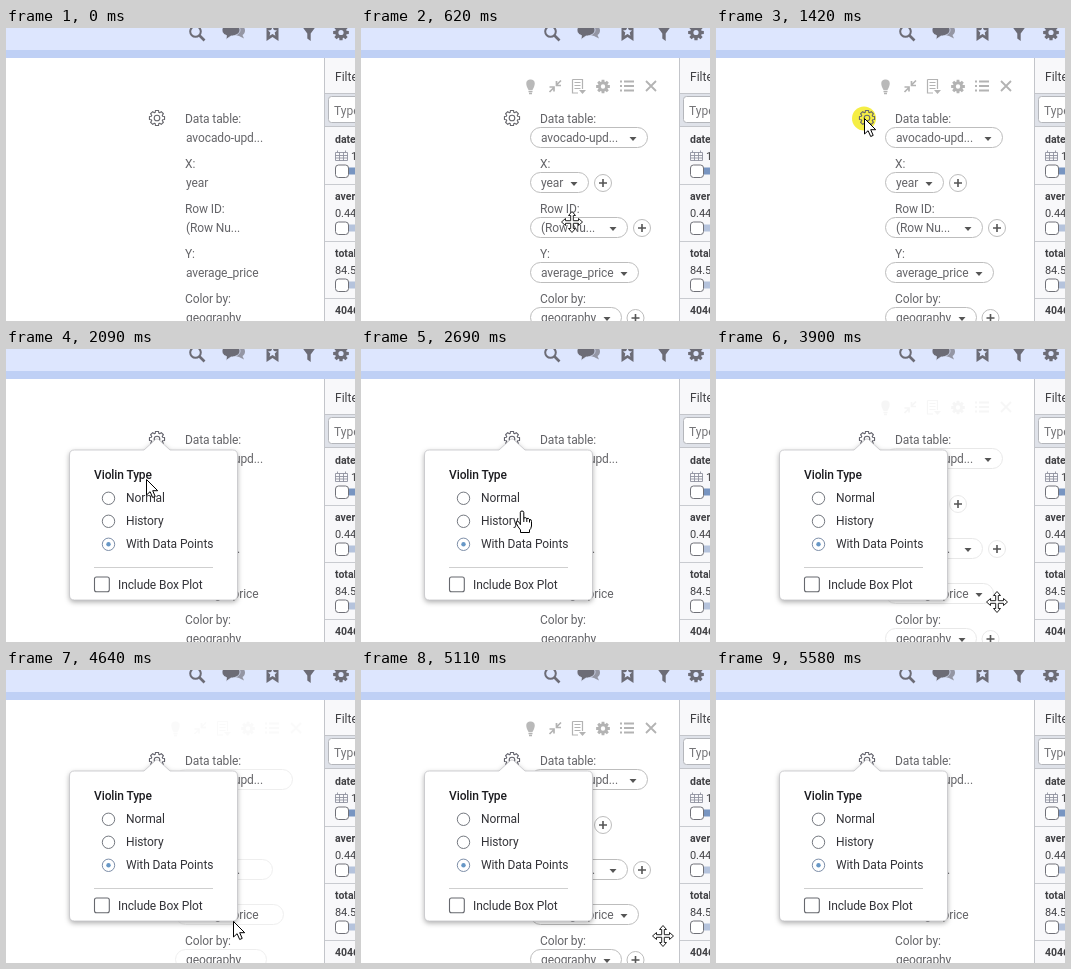
An HTML page for the animation above (6.18 s loop, 349 by 293 pixels).

```html
<!DOCTYPE html>
<html lang="en">
<head>
<meta charset="utf-8">
<title>Violin settings popover</title>
<style>
html, body { margin: 0; width: 100%; height: 100%; overflow: hidden; background: #fff; }
svg { display: block; width: 349px; height: 293px; }
text { font: 12px Roboto, Arial, sans-serif; letter-spacing: -.1px; fill: #646468; white-space: pre; }
.pop text { fill: #333338; }
.pop .title { font-weight: 500; fill: #1c1c20; }
.panel text { font-size: 11px; fill: #404044; }
.panel .name { font-weight: 700; font-size: 10.5px; letter-spacing: 0; }
.panel .head { font-size: 12px; letter-spacing: 0; }
.panel .hint { font-size: 12px; letter-spacing: 0; fill: #757578; }
</style>
</head>
<body>
<svg id="stage" viewBox="0 0 349 293" xmlns="http://www.w3.org/2000/svg">
  <rect width="349" height="293" fill="#fff"/>
  <rect width="349" height="22" fill="#dde6fe"/>
  <rect y="22" width="349" height="8" fill="#bfd0f5"/>

  <g id="header" fill="#6c6c76" stroke="none">
    <g fill="none" stroke="#6c6c76" stroke-width="2">
      <circle cx="189.500" cy="3.500" r="5.300"/>
      <path d="M193.500 7.500L198.500 12.500" stroke-width="2.600"/>
    </g>
    <path d="M231 -3C236 -3 239 -1 239 2.500C239 4.500 238 6 236.500 7L238 10.500L233 8L229 7Z" fill="#9496a4"/>
    <path d="M225 -4C231 -4 234 -1 234 2C234 5.500 230 8 225 8L220 11.500L220.500 7.500C217.500 6.500 216 4.500 216 2C216 -1 219 -4 225 -4Z" stroke="#dde6fe" stroke-width=".8"/>
    <path d="M260.500 -3H272.500V13L266.500 9L260.500 13Z"/>
    <path d="M266.500 -1L267.900 2.100L271 2.400L268.700 4.500L269.400 7.700L266.500 6L263.600 7.700L264.300 4.500L262 2.400L265.100 2.100Z" fill="#dde6fe"/>
    <path d="M296.500 -1H309.500L304.700 5.500V13L301.300 10.500V5.500Z"/>
  </g>

  <g id="fields"></g>
  <g id="tools" fill="none" stroke="#b3b3b3" stroke-width="2">
    <path d="M166 59C163.500 52 168 51.500 169.500 51.500C171 51.500 175.500 52 173 59L171.500 62H167.500Z" fill="#b9b9b9" stroke="none"/>
    <path d="M167.500 63.500H171.500M168 65.500H171" stroke-width="1.300"/>
    <path d="M200 52.500L195.500 57M195.500 53V57.500H200M188.500 64L193 59.500M188.500 59H193V63.500" stroke-width="1.700"/>
    <path d="M211.500 51.500H221.500V61M211.500 51.500V65H217M213.500 54.500H219.500M213.500 57.500H219.500M213.500 60.500H219.500" stroke-width="1.200"/>
    <path d="M218 62H225L221.500 66Z" fill="#b3b3b3" stroke="none"/>
    <path d="M263 53.500H273M263 58H273M263 62.500H273M259 53.500H261M259 58H261M259 62.500H261"/>
    <path d="M285 53L295 63M295 53L285 63" stroke-width="1.800"/>
  </g>

  <g id="panel" class="panel">
    <rect x="318" y="30" width="31" height="263" fill="#f8f8fa"/>
    <rect x="318" y="65" width="31" height="33" fill="#dfe2e9"/>
    <path d="M318.500 30V293M318 65.500H349M318 98.500H349" stroke="#c3c5ca"/>
    <rect x="322.500" y="68.500" width="50" height="26" rx="3" fill="#fff" stroke="#b4b6bb"/>
    <text class="head" x="329" y="53">Filters</text>
    <text class="hint" x="328" y="86.500">Type to search</text>
  </g>

  <circle id="click" cx="148" cy="90.500" r="12" fill="#f5ee45"/>
  <g id="gear"></g>

  <g id="pop" class="pop">
    <g style="filter:drop-shadow(0 2px 2.500px rgba(0,0,0,.3))">
      <path d="M68.500 101H138L149.500 90.500Q151 89.200 152.500 90.500L164 101H226.500Q231.500 101 231.500 106V246Q231.500 251 226.500 251H68.500Q63.500 251 63.500 246V106Q63.500 101 68.500 101Z" fill="#fff" stroke="#c4c4c8" stroke-width=".8"/>
    </g>
    <text class="title" x="88" y="130">Violin Type</text>
    <path d="M88 218.500H207" stroke="#cfcfcf"/>
    <rect id="check" x="88.500" y="228" width="14.800" height="14.800" rx="2" fill="#fff" stroke-width="1.100"/>
    <text x="112" y="240">Include Box Plot</text>
  </g>

  <g id="cursor" stroke-linejoin="round">
    <path id="arrow" d="M.500 .500V16L4.100 12.700L6.700 18.500L9.200 17.400L6.700 11.700H11.700Z" fill="#fff" stroke="#000"/>
    <path id="hand" d="M-1.700 14V1.500Q-1.700 0 0 0Q1.800 0 1.800 1.500V7Q3.500 6 4.800 7.500Q6.500 6.700 7.500 8.500Q9.500 8 9.500 10.500V15Q9 18 7.500 19V21.500H-1.500V19Q-4 16 -5.700 12.500Q-6.200 10 -4.200 10.300Q-2.800 11 -1.700 13M1.800 7V11M4.800 7.500V11M7.500 8.500V11.500" fill="#fff" stroke="#000"/>
    <path id="move" d="M0 -10.500L3.500 -6.500H1.300V-1.300H6.500V-3.500L10.500 0L6.500 3.500V1.300H1.300V6.500H3.500L0 10.500L-3.500 6.500H-1.300V1.300H-6.500V3.500L-10.500 0L-6.500 -3.500V-1.300H-1.300V-6.500H-3.500Z" fill="#fff" stroke="#222"/>
  </g>
</svg>
<script>
const LOOP = 6180, FIRST = 350, STEP = 66.8, FADE = 150;
const OPEN_AT = 1550, CLICK_AT = 1415, LEAVE_AT = 5555;
const el = id => document.getElementById(id);

function add(parent, tag, attrs, text) {
  const node = document.createElementNS('http://www.w3.org/2000/svg', tag);
  for (const k in attrs) node.setAttribute(k, attrs[k]);
  if (text) node.textContent = text;
  parent.appendChild(node);
  return node;
}

// Eight-toothed gear around a hole
function gearPath(cx, cy, outer, inner, hole) {
  let d = '';
  for (let i = 0; i < 8; i++) {
    [[-.31, inner], [-.2, outer], [.2, outer], [.31, inner]].forEach(([off, r]) => {
      const a = (i / 8) * Math.PI * 2 + off;
      d += (d ? 'L' : 'M') + (cx + r * Math.cos(a)).toFixed(2) + ' ' + (cy + r * Math.sin(a)).toFixed(2);
    });
  }
  return `${d}ZM${cx - hole} ${cy}a${hole} ${hole} 0 1 0 ${2 * hole} 0a${hole} ${hole} 0 1 0 ${-2 * hole} 0Z`;
}

add(el('header'), 'path', { d: gearPath(335, 4.5, 8, 5.8, 2.6), 'fill-rule': 'evenodd' });
add(el('tools'), 'path', { d: gearPath(242, 58.5, 7, 5.1, 2.2), 'fill-rule': 'evenodd', fill: '#b3b3b3', stroke: 'none' });
const gear = add(el('gear'), 'path', {
  d: gearPath(151, 90, 7.7, 5.9, 2.8), fill: 'none', 'stroke-width': 1.1, 'stroke-linejoin': 'round'
});

// Axis selectors: label, value, pill right edge, plus button
const fields = el('fields');
const borders = add(fields, 'g', { fill: '#fff', stroke: '#bdbdbd' });
const marks = add(fields, 'g', { fill: '#555', stroke: 'none' });
const rings = add(marks, 'g', { fill: '#fff', stroke: '#bdbdbd' });
[
  ['Data table:', 'avocado-upd...', 286.5, 0],
  ['X:', 'year', 227.5, 242],
  ['Row ID:', '(Row Nu...', 266.5, 281],
  ['Y:', 'average_price', 277.5, 0],
  ['Color by:', 'geography', 260.5, 274.5]
].forEach(([label, value, right, plus], i) => {
  const y = 110 + 45 * i;
  add(borders, 'rect', { x: 169.5, y: y - 10.5, width: right - 169.5, height: 20, rx: 10 });
  add(marks, 'path', { d: `M${right - 18} ${y - 1}h7l-3.500 4z` });
  if (plus) {
    add(rings, 'circle', { cx: plus, cy: y, r: 8.5 });
    add(marks, 'path', { d: `M${plus - 4} ${y}h8M${plus} ${y - 4}v8`, stroke: '#555', 'stroke-width': 1.6 });
  }
  add(fields, 'text', { x: 179, y: y - 15 }, label);
  add(fields, 'text', { x: 180, y: y + 4 }, value);
});

const panel = el('panel');
[['date', '1'], ['average_price', '0.44'], ['total_volume', '84.5'], ['4046', '']].forEach(([name, low], i) => {
  const y = 115 + 57 * i;
  add(panel, 'text', { class: 'name', x: 329, y }, name);
  if (!low) return;
  add(panel, 'text', { x: i ? 329 : 345, y: y + 17 }, low);
  if (!i) add(panel, 'path', {
    d: 'M329.500 124.500h12v8h-12zM329 127.500h13M329 130h13M333.500 124v9M337.500 124v9M331.500 122.500v2M339.500 122.500v2',
    fill: 'none', stroke: '#9092a0', 'stroke-width': .9
  });
  add(panel, 'rect', { x: 342, y: y + 24.5, width: 7, height: 7, fill: i ? '#b5c3dc' : '#7895c1' });
  add(panel, 'rect', { x: 329.5, y: y + 22, width: 13, height: 12.5, rx: 3, fill: '#fff', stroke: '#707178' });
  add(panel, 'path', { d: `M319 ${y + 41.5}h30`, stroke: '#c9cbd0' });
});

const pop = el('pop');
['Normal', 'History', 'With Data Points'].forEach((label, i) => {
  const y = 149 + 23 * i, on = i === 2;
  add(pop, 'circle', { cx: 102.5, cy: y + .3, r: 6.2, fill: '#fff', stroke: on ? '#7d8ea8' : '#74787f' });
  if (on) add(pop, 'circle', { cx: 102.5, cy: y + .3, r: 2.2, fill: '#6797c6' });
  add(pop, 'text', { x: 120, y: y + 4 }, label);
});

// Pointer path: time, x, y
const path = [
  [350, 268, 285], [600, 215, 200], [800, 168, 125], [950, 149, 98], [1020, 149, 97],
  [1150, 148, 90], [1930, 148, 90], [2086, 140, 130], [2290, 138, 202], [2560, 146, 152],
  [2720, 165, 165], [2880, 150, 192], [3100, 128, 228], [3220, 124, 234], [3350, 124, 234],
  [3600, 190, 250], [3890, 281, 253], [3960, 309, 256], [4150, 321, 250], [4300, 300, 255],
  [4625, 227, 251], [4900, 280, 262], [5290, 325, 270], [5560, 326, 272]
];
const hovers = [[350, 1540], [3840, 4512], [4760, 5400]];
const clamp = v => Math.max(0, Math.min(1, v));

function pointer(t) {
  let i = 1;
  while (i < path.length - 1 && path[i][0] < t) i++;
  const a = path[i - 1], b = path[i];
  const k = clamp((t - a[0]) / (b[0] - a[0]));
  return [a[1] + (b[1] - a[1]) * k, a[2] + (b[2] - a[2]) * k];
}

function pointerKind(x, y, open) {
  if (open && x > 64 && x < 232 && y > 101 && y < 253) {
    const onRadio = y > 140 && y < 204, onCheck = y > 224 && y < 248;
    return x < 210 && (onRadio || onCheck) ? 'hand' : 'arrow';
  }
  return x > 165 && x < 312 && y > 95 ? 'move' : 'arrow';
}

const show = (node, on) => { node.style.display = on ? '' : 'none'; };

function draw(time) {
  const t = FIRST + Math.floor((time - FIRST) / STEP) * STEP;
  const open = t >= OPEN_AT;
  const [x, y] = pointer(t);
  const kind = pointerKind(x, y, open);

  let fade = 0, hovered = false;
  for (const [on, off] of hovers) {
    fade = Math.max(fade, Math.min(clamp((t - on) / FADE), 1 - clamp((t - off) / FADE)));
    hovered = hovered || (t >= on && t < off);
  }
  borders.setAttribute('opacity', fade);
  rings.setAttribute('opacity', fade);
  el('tools').setAttribute('opacity', fade * fade);
  show(marks, hovered);

  show(pop, open);
  show(el('click'), t >= CLICK_AT && !open);
  gear.setAttribute('stroke', open ? '#62626c' : '#66666c');
  el('check').setAttribute('stroke', kind === 'hand' && y > 224 ? '#4468c4' : '#66686e');

  show(el('cursor'), t >= FIRST && t < LEAVE_AT);
  el('cursor').setAttribute('transform', `translate(${Math.round(x)} ${Math.round(y)})`);
  for (const id of ['arrow', 'hand', 'move']) show(el(id), id === kind);
}

const start = performance.now();
function tick() {
  draw((performance.now() - start) % LOOP);
  requestAnimationFrame(tick);
}
tick();
</script>
</body>
</html>
```
